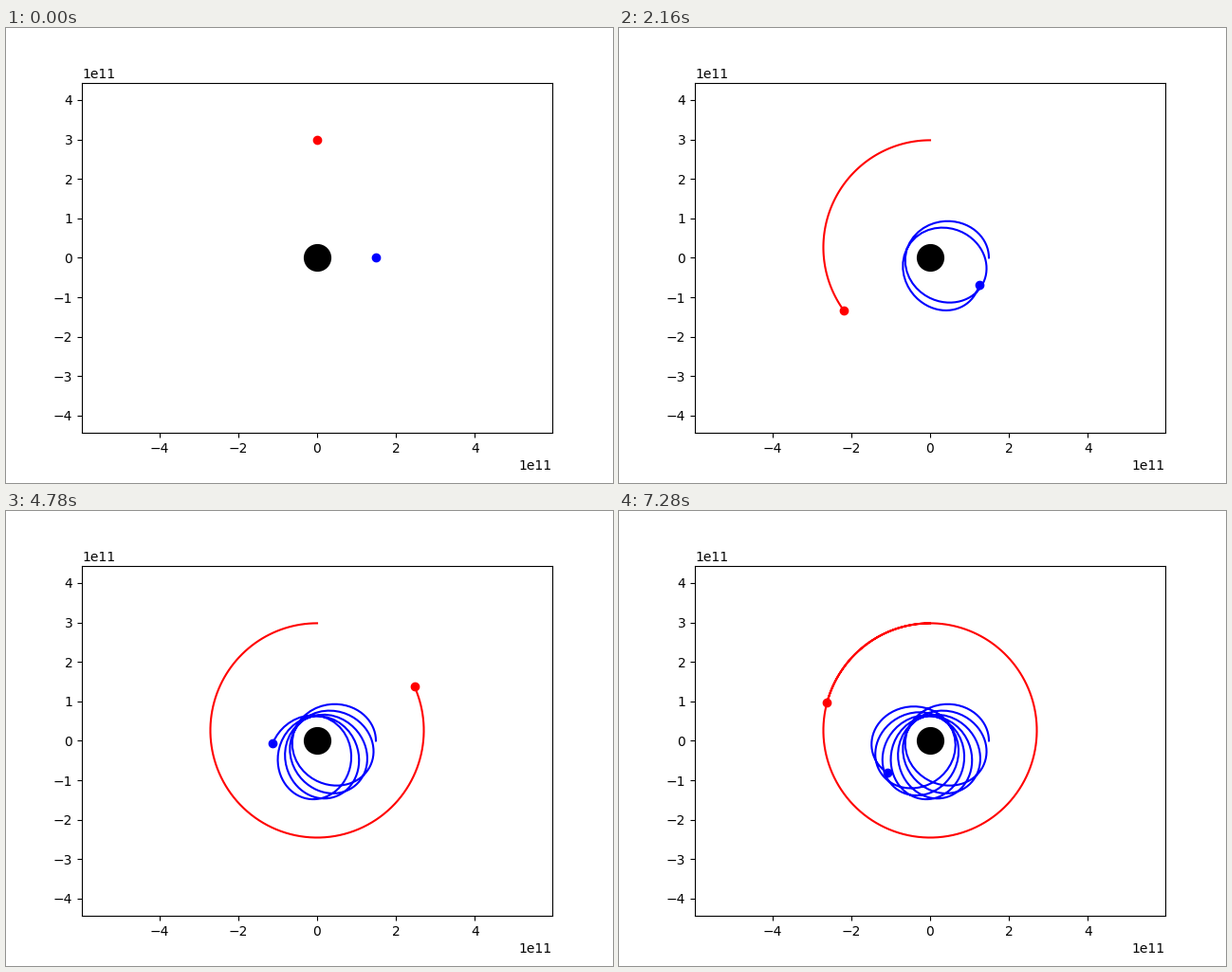
These frames come from a looping animation (640x480 px, 7.3 s). A matplotlib script:

```python
import numpy as np
import matplotlib.pyplot as plt
from matplotlib.animation import FuncAnimation

AU = 1.49e11
FRAMES = 365
INTERVAL = 20


def orbit(far, near, period, start, gamma=1.0):
    """Positions per step on a rosette that starts at its far point.

    far, near: apsis distances; period: steps between far points;
    start: angle of the first far point; gamma: radial cycles per turn.
    """
    a, e = (far + near) / 2, (far - near) / (far + near)
    mean = np.pi + 2 * np.pi * np.arange(FRAMES) / period
    ecc = mean.copy()
    for _ in range(12):
        ecc -= (ecc - e * np.sin(ecc) - mean) / (1 - e * np.cos(ecc))
    true = np.arctan2(np.sqrt(1 - e * e) * np.sin(ecc), np.cos(ecc) - e)
    theta = start + (np.unwrap(true) - true[0]) / gamma
    r = a * (1 - e * np.cos(ecc))
    return r * np.cos(theta), r * np.sin(theta)


inner = orbit(AU, 0.419 * AU, 50.73, 0, gamma=1.0733)
outer = orbit(2 * AU, 1.647 * AU, 297.6, np.pi / 2)

fig, ax = plt.subplots(figsize=(6.4, 4.8), dpi=100)
ax.set_xlim(-4 * AU, 4 * AU)
half = 4 * AU * 369.6 / 496
ax.set_ylim(-half, half)

ax.plot([0], [0], "o", color="black", markersize=20)
bodies = []
for path, color in ((inner, "blue"), (outer, "red")):
    trail, = ax.plot([], [], color=color, lw=1.5)
    dot, = ax.plot([], [], "o", color=color, markersize=6)
    bodies.append((path, trail, dot))


def update(i):
    for (x, y), trail, dot in bodies:
        trail.set_data(x[:i + 1], y[:i + 1])
        dot.set_data(x[i:i + 1], y[i:i + 1])
    return [artist for _, *pair in bodies for artist in pair]


anim = FuncAnimation(fig, update, frames=FRAMES, interval=INTERVAL,
                     init_func=lambda: update(0), repeat=True, repeat_delay=0)
plt.show()
```
